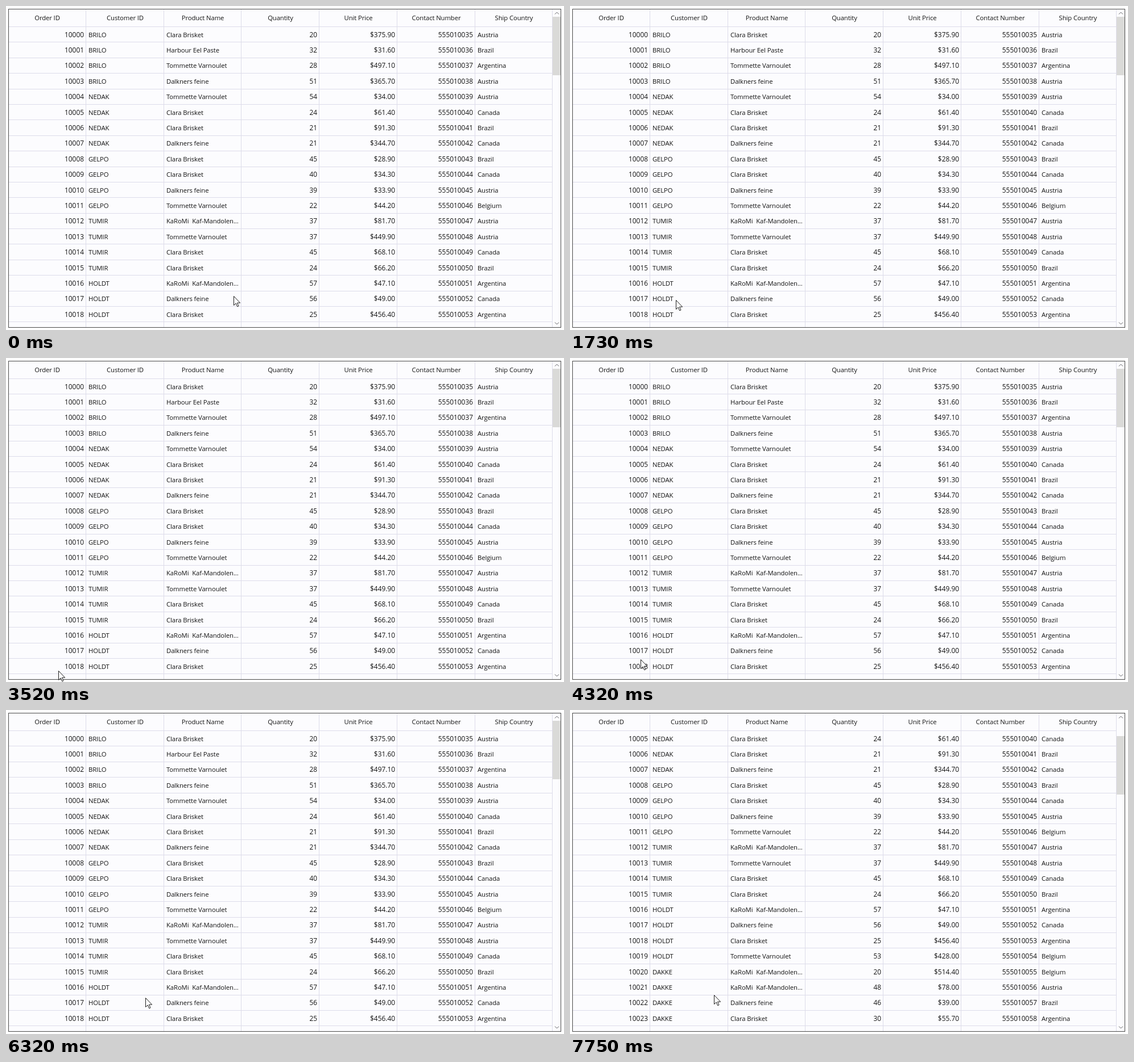
An HTML page for the animation above (8 s loop, 981 by 571 pixels).

```html
<!DOCTYPE html>
<html lang="en">
<head>
<meta charset="utf-8">
<title>Order grid</title>
<style>
html, body { margin: 0; width: 100%; height: 100%; overflow: hidden; background: #fff; }
svg { display: block; width: 981px; height: 571px; }
text { font: 11.3px "Open Sans", "Noto Sans", sans-serif; letter-spacing: -.1px; fill: #141414; }
.num { font-size: 11.9px; letter-spacing: 0; text-anchor: end; }
.head { text-anchor: middle; }
</style>
</head>
<body>
<svg id="stage" viewBox="0 0 981 571">
  <clipPath id="body"><rect x="5" y="37" width="956" height="528"/></clipPath>
  <rect x="4.5" y="5.5" width="971" height="561" fill="#fcfcfe"/>
  <path id="lines" fill="none" stroke="#dddcea"/>
  <g id="heads"></g>
  <g clip-path="url(#body)"><g id="rows"></g></g>
  <rect id="thumb" x="961" y="19" width="14" height="103" fill="#dadad8"/>
  <path d="M965 14.5l3.5-3.5 3.5 3.5M965 557.5l3.5 3.5 3.5-3.5" fill="none" stroke="#606064"/>
  <rect x="4.5" y="5.5" width="971" height="561" fill="none" stroke="#4a4a4a"/>
  <path id="cursor" d="M.5 .5V16.5L4.2 13L6.7 18.8L9 17.8L6.5 12.2H11.6Z" fill="#fff" stroke="#1c1c1c"/>
</svg>
<script>
const LOOP = 8000, ROW = 27.39, ROWS = 24;
const SCROLL_AT = 7550, SCROLL_ROWS = 5, SCROLL_STEP = 50;
const $ = id => document.getElementById(id);

const titles = ["Order ID", "Customer ID", "Product Name", "Quantity", "Unit Price", "Contact Number", "Ship Country"];
const customers = ["BRILO", "NEDAK", "GELPO", "TUMIR", "HOLDT", "DAKKE"];
const products = ["Clara Brisket", "Harbour Eel Paste", "Tommette Varnoulet", "Dalkners feine", "KaRoMi\u00a0\u00a0Kaf-Mandolen..."];
const ordered = "CHTDTCCDCCDTKTCCKDCTKKDC"; // product initials, row by row
const countries = (
  "Austria Brazil Argentina Austria Austria Canada Brazil Canada Brazil Canada Austria Belgium " +
  "Austria Austria Canada Brazil Argentina Canada Argentina Belgium Belgium Austria Brazil Argentina"
).split(" ");

// key poses of the pointer tip: time, x, y
const track = [
  [0, 400, 511], [730, 400, 511], [1730, 186, 518], [2460, 186, 518], [3520, 92, 551],
  [4320, 124, 531], [5580, 94, 540], [6320, 245, 507], [7750, 253, 502], [LOOP, 253, 502]
];

const edge = c => Math.floor(3.85 + 136.7 * c);

function seeded(seed) {
  return () => (seed = (seed * 16807) % 2147483647) / 2147483647;
}

function addText(parent, x, y, value, cls) {
  const el = document.createElementNS("http://www.w3.org/2000/svg", "text");
  el.setAttribute("x", x);
  el.setAttribute("y", y);
  if (cls) el.setAttribute("class", cls);
  el.textContent = value;
  parent.append(el);
}

function drawLines() {
  let d = "";
  for (let c = 1; c <= titles.length; c++) d += `M${edge(c) + .5} 6V566`;
  for (let i = 0; i < 20; i++) d += `M5 ${Math.round(36 + i * ROW) + .5}H961`;
  $("lines").setAttribute("d", d);
}

function drawRow(i, random) {
  const quantity = 20 + Math.floor(random() * 39);
  const tens = random() < .25 ? 3000 + random() * 2200 : 190 + random() * 730;
  const cells = [
    10000 + i,
    customers[i >> 2],
    products.find(name => name[0] === ordered[i]),
    quantity,
    "$" + (Math.floor(tens) / 10).toFixed(2),
    555010035 + i,
    countries[i]
  ];
  cells.forEach((value, c) => {
    const isNum = typeof value === "number" || value[0] === "$";
    addText($("rows"), isNum ? edge(c + 1) - 3 : edge(c) + 5, 54.7 + i * ROW, value, isNum ? "num" : "");
  });
}

function build() {
  drawLines();
  titles.forEach((title, c) => addText($("heads"), (edge(c) + edge(c + 1)) / 2 + 1, 25, title, "head"));
  const random = seeded(2024);
  for (let i = 0; i < ROWS; i++) drawRow(i, random);
}

function pointerAt(t) {
  const i = track.findIndex(p => p[0] > t);
  const [t0, x0, y0] = track[i - 1], [t1, x1, y1] = track[i];
  const k = (t - t0) / (t1 - t0), e = k * k * (3 - 2 * k);
  return [x0 + (x1 - x0) * e, y0 + (y1 - y0) * e].map(Math.round);
}

function render(t) {
  const steps = 1 + Math.floor((t - SCROLL_AT) / SCROLL_STEP);
  const scrolled = Math.max(0, Math.min(SCROLL_ROWS, steps));
  $("rows").setAttribute("transform", `translate(0 ${-scrolled * ROW})`);
  $("thumb").setAttribute("y", 19 + Math.round(scrolled * 5.3));
  $("cursor").setAttribute("transform", `translate(${pointerAt(t)})`);
}

build();
const start = performance.now();
function tick() {
  render((performance.now() - start) % LOOP);
  requestAnimationFrame(tick);
}
tick();
</script>
</body>
</html>
```
